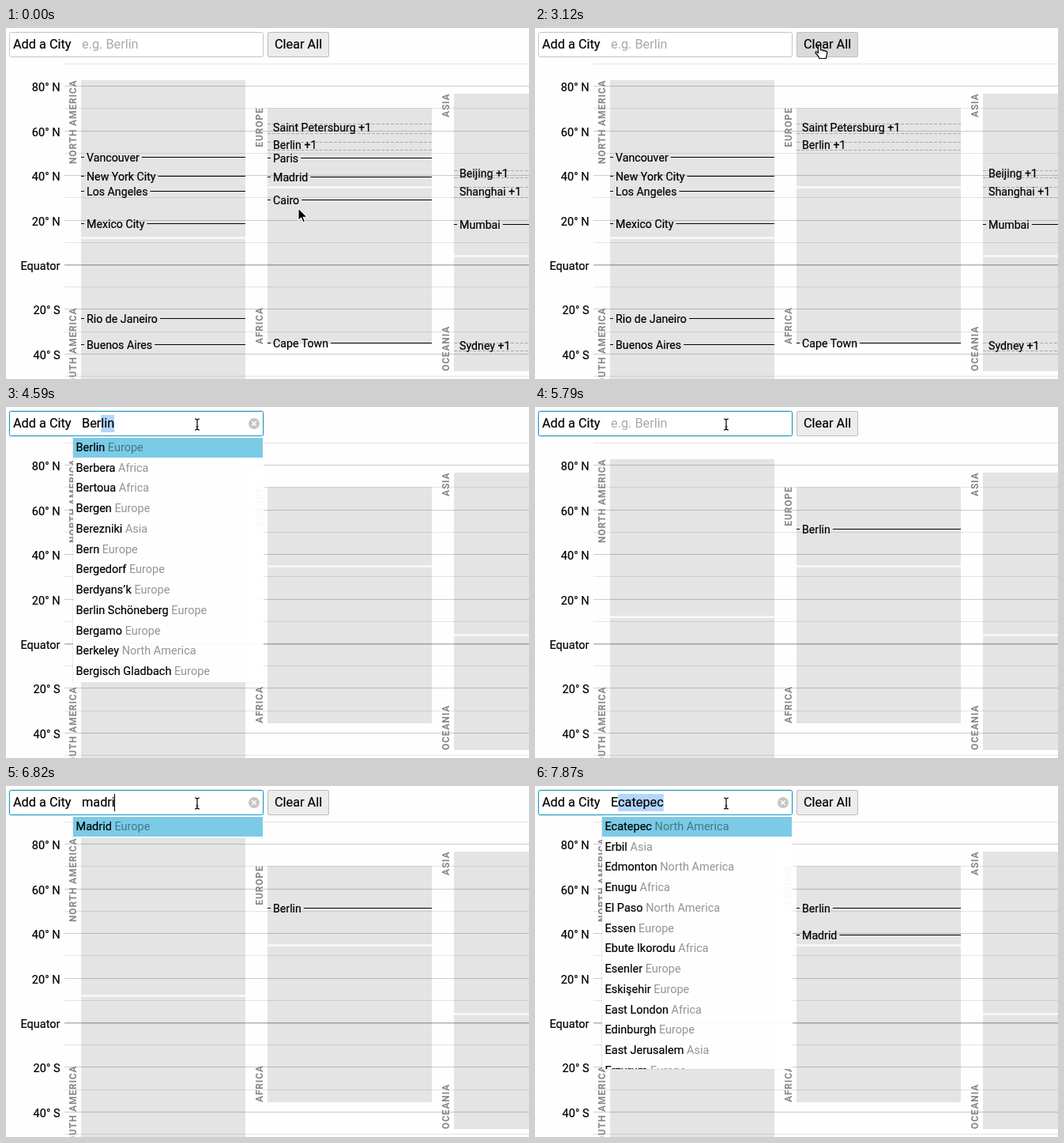
Recreate the animation shown at these times as an HTML page. Size 662 by 444 pixels, loop 8000 ms.

```html
<!DOCTYPE html>
<html lang="en">
<head>
<meta charset="utf-8">
<title>Cities by latitude</title>
<style>
  html, body { margin: 0; width: 100%; height: 100%; overflow: hidden; background: #fefefe; }
  svg { display: block; }
  text { font: 14.2px Roboto, "Noto Sans", sans-serif; white-space: pre; stroke: #000; stroke-width: .2px; }
  .axis, .row { font-size: 14.5px; }
  .form { font-size: 16.3px; }
  .cont { font-size: 12px; font-weight: 700; letter-spacing: .85px; fill: #888; stroke: none; }
  .hint { fill: #aaa; stroke: none; }
  .region { fill: #000; fill-opacity: .42; stroke: none; }
</style>
</head>
<body>
<svg id="stage" width="662" height="444" viewBox="0 0 662 444"></svg>
<script>
const LOOP = 8000, ROW = 25.73, BLACK = '#000';
const stage = document.getElementById('stage');

function add(parent, tag, attrs = {}, text) {
  const el = document.createElementNS('http://www.w3.org/2000/svg', tag);
  for (const k in attrs) el.setAttribute(k, attrs[k]);
  if (text !== undefined) el.textContent = text;
  parent.appendChild(el);
  return el;
}
const group = (parent = stage) => add(parent, 'g');
const rect = (p, x, y, width, height, fill, more) => add(p, 'rect', { x, y, width, height, fill, ...more });
const line = (p, x1, x2, y, stroke, more) => add(p, 'line', { x1, x2, y1: y, y2: y, stroke, ...more });
const label = (p, x, y, text, cls, more) => add(p, 'text', { x, y, class: cls || '', ...more }, text);
const show = (el, on) => el.setAttribute('visibility', on ? 'visible' : 'hidden');

// Continents: x, width, top, gap, bottom
for (const [x, w, top, gap, bottom] of [[95, 208, 66, 264, 444], [331, 208, 101, 200, 400], [567, 95, 83, 287, 434]]) {
  rect(stage, x, top, w, bottom - top, '#e4e4e4');
  rect(stage, x, gap, w, 3, '#f6f6f6');
}

// Latitude grid
for (let k = 9; k >= -5; k--) {
  const y = Math.floor(299.5 - 28.22 * k) + .5, major = k % 2 === 0;
  if (k === 0) line(stage, 74, 662, 299.75, BLACK, { 'stroke-opacity': .3, 'stroke-width': 1.5 });
  else line(stage, 74, 662, y, BLACK, { 'stroke-opacity': major ? .2 : .1 });
  if (major) {
    const name = k ? Math.abs(k) * 10 + '° ' + (k > 0 ? 'N' : 'S') : 'Equator';
    label(stage, 68.5, y + 6.5, name, 'axis', { 'text-anchor': 'end' });
  }
}
for (const [name, x, y, anchor] of [
  ['NORTH AMERICA', 89, 65.5, 'end'], ['SOUTH AMERICA', 89, 353.5, 'end'],
  ['EUROPE', 325, 100.5, 'end'], ['AFRICA', 325, 400, 'start'],
  ['ASIA', 561, 82.5, 'end'], ['OCEANIA', 561, 434, 'start']
]) label(stage, 0, 0, name, 'cont', { transform: `translate(${x} ${y}) rotate(-90)`, 'text-anchor': anchor });

// Cities
const rest = group(), cities = { rest: { g: rest } };
function city(parent, name, x, y) {
  const g = group(parent), right = Math.min(x + 208, 662);
  line(g, x, x + 4, y, BLACK);
  const t = label(g, x + 7, y + 5, name);
  const end = x + 7 + t.getComputedTextLength();
  const rule = line(g, end + 3, right, y, BLACK);
  const btn = group(g);
  const box = rect(btn, end + 2.5, y - 11.5, 16, 22, '#aaa', { rx: 4, stroke: '#78abe8', 'stroke-width': 3 });
  const cx = end + 10.5;
  add(btn, 'path', { d: `M${cx - 3} ${y - 3}l6 6m0 -6l-6 6`, stroke: '#333', 'stroke-width': 1.5 });
  show(btn, false);
  return {
    g,
    set(visible, mode) {
      show(g, visible);
      show(btn, visible && mode > 0);
      show(box, visible && mode > 1);
      rule.setAttribute('x1', end + (mode ? 20 : 3));
    }
  };
}
function cluster(name, x, y, y1, y2) {
  for (const ly of [y1, y2])
    line(rest, x, Math.min(x + 208, 662), ly, '#aaa', { 'stroke-dasharray': '4 2' });
  label(rest, x + 7, y, name);
}
for (const [name, x, y] of [
  ['Vancouver', 95, 163.5], ['New York City', 95, 187.5], ['Los Angeles', 95, 206.5], ['Mexico City', 95, 247.5],
  ['Rio de Janeiro', 95, 367.5], ['Buenos Aires', 95, 400.5], ['Cape Town', 331, 398.5], ['Mumbai', 567, 248.5]
]) city(rest, name, x, y);
cluster('Saint Petersburg +1', 331, 131, 121.5, 133.5);
cluster('Berlin +1', 331, 153, 144.5, 154.5);
cluster('Beijing +1', 567, 189, 180.5, 189.5);
cluster('Shanghai +1', 567, 212, 201.5, 214.5);
cluster('Sydney +1', 567, 407, 398.5, 408.5);
for (const [name, y] of [['Paris', 164.5], ['Madrid', 188.5], ['Cairo', 217.5], ['Berlin', 154.5]])
  cities[name] = city(stage, name, 331, y);

// Search field and button
const glow = rect(stage, 4, 5, 322, 32, 'none', { rx: 3, stroke: '#1593bd', 'stroke-width': 3, 'stroke-opacity': .1 });
const field = rect(stage, 4.5, 5.5, 321, 31, '#fff', { rx: 2 });
label(stage, 9, 26, 'Add a City', 'form');
const mark = rect(stage, 96, 10, 0, 22, '#b3d6fd');
const hint = label(stage, 96, 26, 'e.g. Berlin', 'form hint');
const entry = label(stage, 96, 26, '', 'form');
const caret = rect(stage, 95, 10, 1, 22, BLACK);
const wipe = group();
add(wipe, 'circle', { cx: 314, cy: 21, r: 7, fill: '#c6c6c6' });
add(wipe, 'path', { d: 'M311.3 18.3l5.4 5.4m0 -5.4l-5.4 5.4', stroke: '#fff', 'stroke-width': 1.6 });
const clear = group();
const clearBox = rect(clear, 331.5, 5.5, 77, 31, '#ececec', { rx: 1.5, stroke: '#bdbdbd' });
label(clear, 340, 26, 'Clear All', 'form');

// Suggestions
const REGION = { E: 'Europe', F: 'Africa', A: 'Asia', N: 'North America', S: 'South America' };
const LISTS = {
  be: 'Beijing:A,Berlin:E,Belo Horizonte:S,Belém:S,Belgrade:E,Benin City:F,Beirut:A,Benghazi:F,Bekasi:A,Belgaum:A,Belfast:E,Bergen:E,Bern:E',
  ber: 'Berlin:E,Berbera:F,Bertoua:F,Bergen:E,Berezniki:A,Bern:E,Bergedorf:E,Berdyans’k:E,Berlin Schöneberg:E,Bergamo:E,Berkeley:N,Bergisch Gladbach:E',
  ma: 'Madrid:E,Mashhad:A,Maracaibo:S,Maracay:S,Manila:A,Manaus:S,Manhattan:N,Makassar:A,Mandalay:A,Maputo:F,Malingao:A,Maiduguri:F,Managua:N',
  mad: 'Madrid:E,Madurai:A,Madison:N,Madiun:A',
  madrid: 'Madrid:E',
  e: 'Ecatepec:N,Erbil:A,Edmonton:N,Enugu:F,El Paso:N,Essen:E,Ebute Ikorodu:F,Esenler:E,Eskişehir:E,East London:F,Edinburgh:E,East Jerusalem:A,Erzurum:E'
};
const menus = {};
for (const key in LISTS) {
  const rows = LISTS[key].split(','), height = Math.min(rows.length * ROW + 2, 320);
  const g = menus[key] = group();
  rect(g, 84.5, 38, 241, height, 'none', { stroke: BLACK, 'stroke-opacity': .08 });
  const pane = add(g, 'svg', { x: 85, y: 37, width: 241, height: height + 1 });
  rect(pane, 0, 0, 241, height + 1, '#fff', { 'fill-opacity': .95 });
  rect(pane, 0, 2, 240, 25, '#7bcbe6');
  rows.forEach((row, i) => {
    const [name, r] = row.split(':');
    const t = label(pane, 3.5, i * ROW + 19, name + ' ', 'row');
    add(t, 'tspan', { class: 'region' }, REGION[r]);
  });
}

// Pointers, placed by their hot spot
const pointers = { arrow: group(), hand: group(), beam: group() };
add(pointers.arrow, 'path', { d: 'M0 0V15.5L3.6 12.2L6 17.8L8.6 16.7L6.2 11.2H11.2Z', fill: BLACK, stroke: '#fff', 'stroke-width': 1.1 });
add(pointers.hand, 'path', {
  d: 'M-1.6 9.5V1.6A1.6 1.6 0 0 1 1.6 1.6V6.2C2 5.4 4.4 5.4 4.7 6.7C5.2 5.9 7.2 6.2 7.4 7.5C8 6.8 9.8 7.2 9.8 8.8C9.8 12 8.6 13 8.4 16.5H0C-.5 14 -3.6 11.5 -4.8 9.6C-5.6 8 -3.6 7.2 -1.6 9.5Z',
  fill: '#fff', stroke: BLACK, 'stroke-width': 1.2
});
for (const [stroke, w] of [['#fff', 2.6], [BLACK, 1.2]])
  add(pointers.beam, 'path', { d: 'M-3 -7Q0 -7 0 -5V5Q0 7 -3 7M3 -7Q0 -7 0 -5M0 5Q0 7 3 7M-1.5 3H1.5', fill: 'none', stroke, 'stroke-width': w });

// Each step changes part of the state and holds until the next
const at = (shape, x, y) => ({ shape, x, y });
const type = (typed, rest, menu) => ({ typed, rest, menu, caret: !rest });
const empty = type('', '', '');
const steps = [
  [0, { ...at('arrow', 370, 228), on: ['rest', 'Paris', 'Madrid', 'Cairo'], hover: '', press: false, focus: false, button: 1, ...empty }],
  [140, at('arrow', 372, 225)],
  [290, { ...at('arrow', 376, 220), hover: 'Cairo' }],
  [440, at('hand', 380, 217)],
  [590, at('hand', 381, 216)],
  [740, { press: true }],
  [890, { on: ['rest', 'Paris', 'Madrid'], hover: '', press: false, ...at('arrow', 381, 214) }],
  [1040, { ...at('hand', 389, 195), hover: 'Madrid' }],
  [1190, at('hand', 391, 190)],
  [1340, at('hand', 392, 188)],
  [1490, at('hand', 392.5, 187)],
  [1640, { press: true }],
  [1790, { on: ['rest', 'Paris'], hover: '', press: false, ...at('arrow', 392, 187) }],
  [1930, { ...at('arrow', 385, 173), hover: 'Paris' }],
  [2080, at('hand', 380, 164)],
  [2230, { press: true }],
  [2530, { on: ['rest'], hover: '', press: false, ...at('arrow', 380, 162) }],
  [2680, at('arrow', 377, 130)],
  [2830, at('arrow', 369, 76)],
  [2970, { ...at('hand', 362, 33), button: 2 }],
  [3120, at('hand', 360, 22)],
  [3410, { on: [], button: 0, ...at('arrow', 358, 22) }],
  [3560, at('beam', 296, 22)],
  [3700, at('beam', 242, 22)],
  [3850, { focus: true }],
  [4440, type('Be', 'ijing', 'be')],
  [4590, type('Ber', 'lin', 'ber')],
  [5190, { ...empty, on: ['Berlin'], button: 1 }],
  [5790, { caret: false }],
  [6230, { caret: true }],
  [6530, type('Ma', 'drid', 'ma')],
  [6680, type('Mad', 'rid', 'mad')],
  [6820, type('madri', '', 'madrid')],
  [6970, type('Madrid', '', 'madrid')],
  [7120, { ...empty, on: ['Berlin', 'Madrid'] }],
  [7720, { caret: false }],
  [7870, type('E', 'catepec', 'e')]
];

function draw(s) {
  for (const name in cities) {
    const c = cities[name], on = s.on.includes(name);
    if (c.set) c.set(on, s.hover === name ? (s.press ? 2 : 1) : 0);
    else c.g.style.display = on ? '' : 'none';
  }
  show(glow, s.focus);
  field.setAttribute('stroke', s.focus ? '#1593bd' : '#c4c4c4');

  const full = s.typed + s.rest;
  entry.textContent = full;
  const typedWidth = s.typed ? entry.getSubStringLength(0, s.typed.length) : 0;
  const width = full ? entry.getComputedTextLength() : 0;
  mark.setAttribute('x', 96 + typedWidth);
  mark.setAttribute('width', s.rest ? width - typedWidth : 0);
  caret.setAttribute('x', 95 + Math.round(typedWidth));
  show(caret, s.focus && s.caret);
  show(hint, !full);
  show(wipe, full);
  for (const key in menus) menus[key].style.display = key === s.menu ? '' : 'none';

  show(clear, s.button);
  clearBox.setAttribute('fill', s.button > 1 ? '#dadada' : '#ececec');
  for (const key in pointers) show(pointers[key], key === s.shape);
  pointers[s.shape].setAttribute('transform', `translate(${s.x} ${s.y})`);
}

let last = -1;
const start = performance.now();
function tick() {
  const t = (performance.now() - start) % LOOP;
  const count = steps.filter(([time]) => time <= t).length;
  if (count !== last) {
    last = count;
    draw(Object.assign({}, ...steps.slice(0, count).map(step => step[1])));
  }
  requestAnimationFrame(tick);
}
tick();
</script>
</body>
</html>
```
